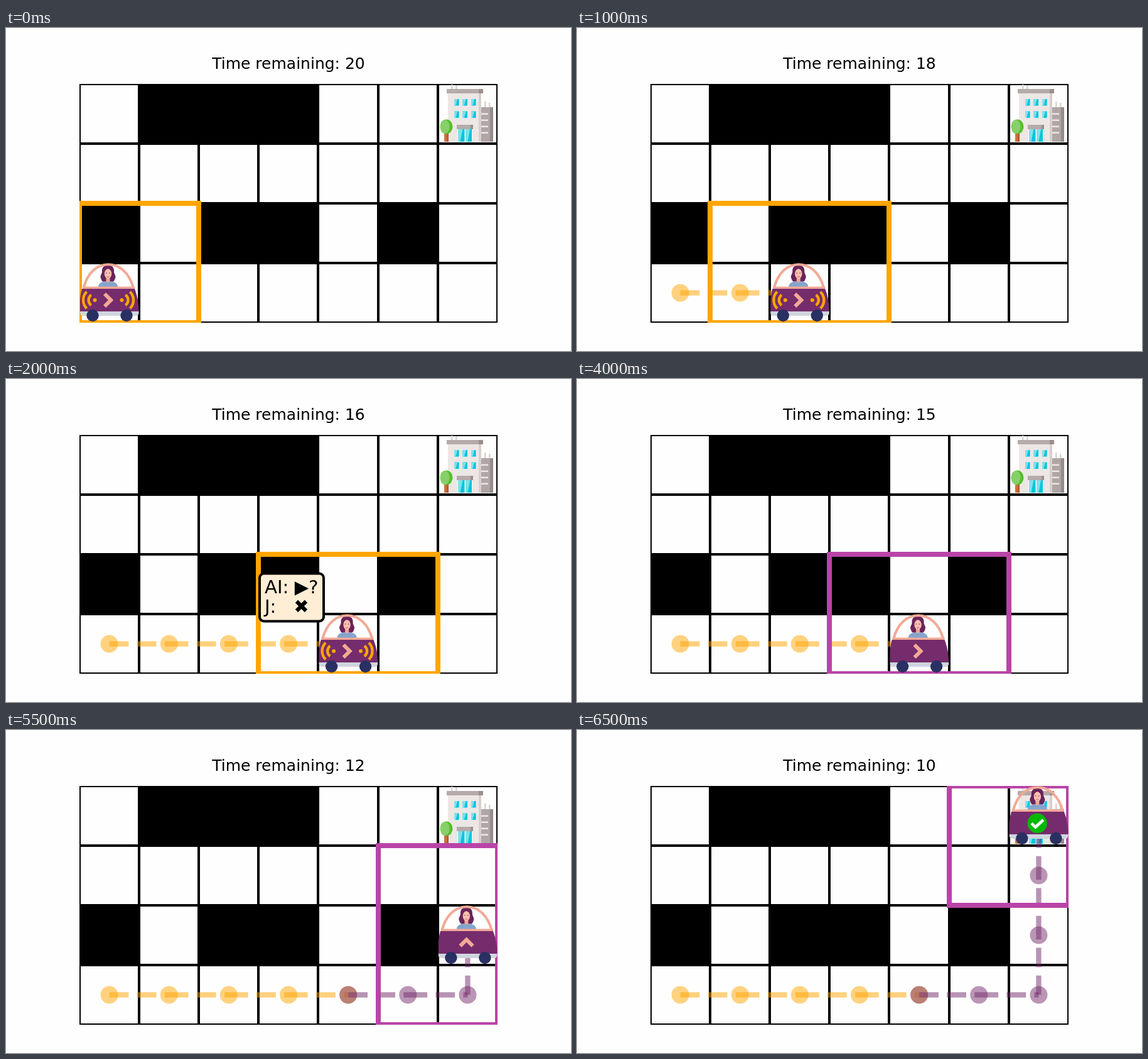
An HTML page with a canvas that plays this animation: 900 px wide and 514 px high, repeating every 8500 ms.

```html
<!DOCTYPE html>
<html lang="en">
<head>
<meta charset="utf-8">
<title>Shared driving grid</title>
<style>
  html, body { margin: 0; width: 100%; height: 100%; overflow: hidden; background: #fefefe; }
  canvas { display: block; }
</style>
</head>
<body>
<canvas id="stage" width="900" height="514"></canvas>
<script>
const ctx = document.getElementById('stage').getContext('2d');
const LEFT = 117, TOP = 89, COLS = 7, ROWS = 4, CELL_W = 666 / 7, CELL_H = 95;
const ORANGE = '#ffa500', MAGENTA = '#b944a8', PLUM = '#752c6c', PINK = '#f2a996';
const WALLS = [[1, 0], [2, 0], [3, 0], [0, 2], [2, 2], [3, 2], [5, 2]];
// One stop per tick; the car waits in column 4 while control is handed over.
const STOPS = [[0, 3], [1, 3], [2, 3], [3, 3], [4, 3], [4, 3], [5, 3], [6, 3], [6, 2], [6, 1], [6, 0]];
const HANDOVER = 5, TURN = 7, LAST = STOPS.length - 1, LOOP = 8500;

const lineX = col => LEFT + Math.floor(col * CELL_W + 0.4);
const lineY = row => TOP + row * CELL_H;
const center = ([col, row]) => [LEFT + (col + 0.5) * CELL_W, TOP + (row + 0.5) * CELL_H];

function rect(color, x, y, w, h) {
  ctx.fillStyle = color;
  ctx.fillRect(x, y, w, h);
}

function fill(color, d) {
  ctx.fillStyle = color;
  ctx.fill(new Path2D(d));
}

function stroke(color, width, d) {
  ctx.strokeStyle = color;
  ctx.lineWidth = width;
  ctx.stroke(new Path2D(d));
}

function ellipse(color, x, y, rx, ry = rx) {
  ctx.fillStyle = color;
  ctx.beginPath();
  ctx.ellipse(x, y, rx, ry, 0, 0, 2 * Math.PI);
  ctx.fill();
}

function text(str, x, y, size, align) {
  ctx.fillStyle = '#000';
  ctx.font = `${size}px "DejaVu Sans", sans-serif`;
  ctx.textAlign = align;
  ctx.fillText(str, x, y);
}

function drawGrid() {
  for (const [c, r] of WALLS) rect('#000', lineX(c), lineY(r), lineX(c + 1) - lineX(c), CELL_H);
  for (let c = 0; c <= COLS; c++) rect('#000', lineX(c) - 2, TOP, 4, ROWS * CELL_H);
  for (let r = 0; r <= ROWS; r++) rect('#000', LEFT, lineY(r) - 2, COLS * CELL_W, 4);
}

function drawGlass(x, y, w, h) {
  rect('#00c4dc', x, y, w, h);
  fill('#7fe0ea', `M${x} ${y}h${w * 0.7}L${x + w * 0.3} ${y + h}H${x}Z`);
}

function drawBuilding() {
  for (const [x, y] of [[709, 90], [716, 91], [762, 117], [769, 119]]) rect('#d8d3d2', x, y, 2.5, 9);
  rect('#ece7e5', 704, 104, 49, 77);
  rect('#d8cfcc', 753, 104, 4, 77);
  rect('#b5abaa', 702, 97, 51, 7);
  rect('#9b908f', 753, 97, 7, 7);
  for (const y of [113, 132.5]) for (const x of [714, 727.5, 741]) drawGlass(x, y, 7.5, 10.5);
  rect('#fff', 719, 161, 24, 20);
  drawGlass(720.5, 161, 10, 20);
  drawGlass(732.5, 161, 9.5, 20);
  rect('#b5abaa', 718, 154, 22, 7);
  rect('#9b908f', 740, 154, 4, 7);
  rect('#b0a6a6', 757, 126, 14, 55);
  rect('#968c8c', 771, 126, 5, 55);
  for (let y = 135.5; y < 170; y += 10) rect('#ebe6e5', 757, y, 11, 2.5);
  rect('#d2703c', 698, 164, 7, 17);
  rect('#b85a30', 702, 164, 3, 17);
  ellipse('#55bf2c', 701.5, 157, 10, 11.5);
  ellipse('#86d069', 699, 157, 7.5, 11);
}

function drawTrail(tick) {
  ctx.save();
  ctx.globalAlpha = 0.5;
  ctx.setLineDash([30.8, 13.3]);
  for (let i = 0; i < tick; i++) {
    const color = i < HANDOVER ? ORANGE : PLUM;
    const from = center(STOPS[i]), to = center(STOPS[i + 1]);
    ellipse(color, ...from, 14);
    if (from[0] !== to[0] || from[1] !== to[1]) stroke(color, 8.3, `M${from}L${to}`);
  }
  ctx.restore();
}

// Outlines the car's cell and its neighbours, cut off at the board edge.
function drawView([col, row], color) {
  const x0 = lineX(Math.max(col - 1, 0)), x1 = lineX(Math.min(col + 2, COLS));
  const y0 = lineY(Math.max(row - 1, 0)), y1 = lineY(Math.min(row + 2, ROWS));
  ctx.strokeStyle = color;
  ctx.lineWidth = 8;
  ctx.strokeRect(x0, y0, x1 - x0, y1 - y0);
}

function drawDriver() {
  fill('#6b2459', 'M162.5 378C156 377 152.500 382 153 387C153.500 391 149 394 151 398C152 401 153 404 157 404H168C172 404 173 401 174 398C176 394 171.500 391 172 387C172.500 382 169 377 162.500 378Z');
  fill('#85a5ce', 'M147 412C147 406 152 404 158 403H167C173 404 178 406 178 412Z');
  fill('#eea595', 'M159.500 396H165.500V403Q162.500 407 159.500 403Z');
  ellipse('#f7c0b0', 162.5, 391, 5.7, 7.7);
  fill('#6b2459', 'M156.500 389Q158 384 162.500 382.500Q167 384 168.500 389L169 383L162.500 380L156 383Z');
  ellipse('#6b2459', 160, 390, 0.8);
  ellipse('#6b2459', 165, 390, 0.8);
  stroke('#c9586a', 1, 'M160.500 395.500Q162.500 397 164.500 395.500');
}

function drawWaves() {
  ctx.strokeStyle = ORANGE;
  ctx.lineWidth = 4.3;
  for (const side of [-1, 1]) {
    const x = 163 + side * 21.5, facing = side < 0 ? Math.PI : 0;
    ellipse(ORANGE, x, 433, 3);
    for (const [radius, spread] of [[10, 0.95], [18.5, 0.8]]) {
      ctx.beginPath();
      ctx.arc(x, 433, radius, facing - spread, facing + spread);
      ctx.stroke();
    }
  }
}

// Drawn in bottom-left cell coordinates, then shifted to the current cell.
function drawCar([col, row], tick) {
  ctx.save();
  ctx.translate(col * CELL_W, (row - 3) * CELL_H);
  drawDriver();
  stroke(PINK, 4, 'M123.500 414C130 389 145 376.200 163 376.200S196 389 203 414');
  rect(PINK, 122, 411.5, 83, 3.5);
  fill('#cfd6de', 'M118 450H211.500V454Q211 458 206 458H123Q118.500 458 118 454Z');
  fill(PLUM, 'M121 415H205Q211.500 432 211.500 451H118V432Q119 422 121 415Z');
  ellipse('#293062', 138, 457.5, 9.7);
  ellipse('#293062', 192, 457.5, 9.7);
  if (tick < HANDOVER) drawWaves();
  if (tick === LAST) {
    ellipse('#00b900', 162.3, 433.5, 15.7);
    stroke('#fff', 4.6, 'M153 433.500L159.500 439.500L172 428');
  } else {
    ctx.translate(162.7, 433);
    if (tick >= TURN) ctx.rotate(-Math.PI / 2);
    stroke(PINK, 6, 'M-5.700 -10L4.300 0L-5.700 10');
  }
  ctx.restore();
}

function drawDialog() {
  ctx.beginPath();
  ctx.roundRect(404, 309.5, 102, 76, 7);
  ctx.fillStyle = '#ffedd6';
  ctx.fill();
  ctx.strokeStyle = '#000';
  ctx.lineWidth = 4;
  ctx.stroke();
  text('AI: ▶?', 412, 341, 29.17, 'left');
  text('J:   ✖', 412, 372, 29.17, 'left');
}

function tickAt(time) {
  const half = Math.floor(time / 500);
  return half < 8 ? Math.min(half, 4) : Math.min(half - 3, LAST);
}

function render() {
  const tick = tickAt(performance.now() % LOOP);
  const stop = STOPS[tick];
  rect('#fefefe', 0, 0, 900, 514);
  text(`Time remaining: ${20 - tick}`, 450, 64.7, 25, 'center');
  ctx.save();
  ctx.beginPath();
  ctx.rect(LEFT, TOP, COLS * CELL_W, ROWS * CELL_H);
  ctx.clip();
  drawGrid();
  drawBuilding();
  drawTrail(tick);
  drawView(stop, tick < HANDOVER ? ORANGE : MAGENTA);
  drawCar(stop, tick);
  ctx.restore();
  if (tick === HANDOVER - 1) drawDialog();
  requestAnimationFrame(render);
}

render();
</script>
</body>
</html>
```
